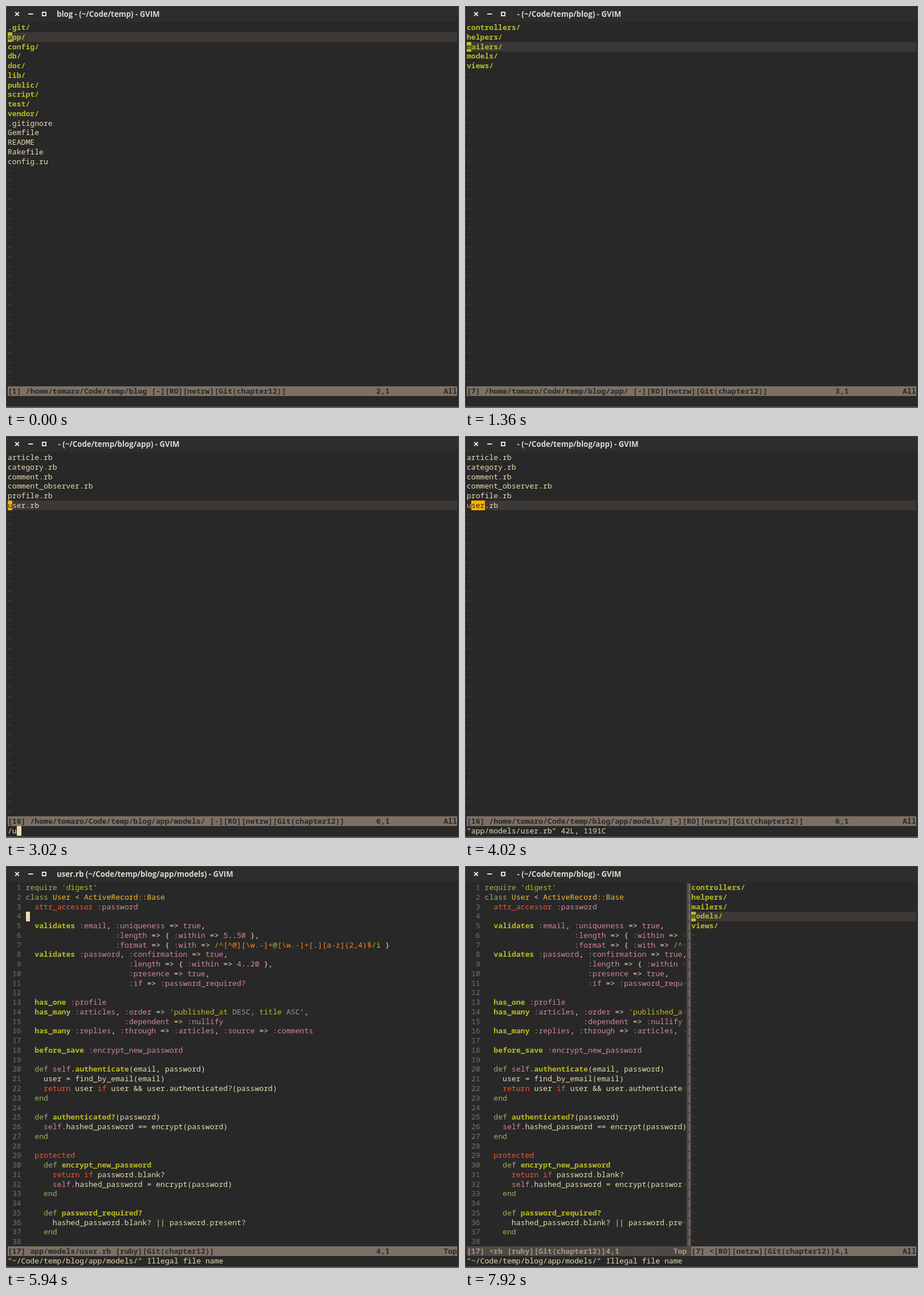
Recreate the animation shown at these times as an HTML page. Size 795 by 704 pixels, loop 8 s.

```html
<!DOCTYPE html>
<html lang="en">
<head>
<meta charset="utf-8">
<title>Editor session</title>
<style>
html, body { margin: 0; width: 100%; height: 100%; overflow: hidden; background: #282828; }
svg { display: block; width: 795px; height: 704px; }
#grid text { font: 13.143px "Noto Sans Mono", "DejaVu Sans Mono", monospace; white-space: pre; }
#grid text.b { font-weight: 700; }
rect { shape-rendering: crispEdges; }
#title { font: 700 13.25px "Open Sans", "Noto Sans", sans-serif; fill: #dcd9d2; }
</style>
</head>
<body>
<svg viewBox="0 0 795 704" xmlns="http://www.w3.org/2000/svg">
  <rect width="795" height="704" fill="#282828"/>
  <rect width="795" height="28" fill="#2d2d2c"/>
  <rect width="795" height="1" fill="#454542"/>
  <rect width="1" height="704" fill="#474744"/>
  <rect x="794" width="1" height="704" fill="#474744"/>
  <rect y="702" width="795" height="1" fill="#93938f"/>
  <g stroke="#e4e1da" fill="none">
    <path d="M16.2 10.7l6.6 6.6m0-6.6l-6.6 6.6" stroke-width="2"/>
    <path d="M39 14h8.500" stroke-width="2"/>
    <rect x="64" y="11" width="6" height="6" stroke-width="2"/>
  </g>
  <text id="title" y="18.600"></text>
  <g id="grid"></g>
</svg>
<script>
const LOOP = 8000, CW = 7.886, RH = 16.757, X0 = 3, Y0 = 29.5;
const COLS = 100, STATUS = 38, CMD = 39;
const BG = '#282828', FG = '#ebdbb2', GREEN = '#b8bb26', AQUA = '#9bb25c', RED = '#f5562f',
  PURPLE = '#d3869b', YELLOW = '#fabd2f', ORANGE = '#fe8019', BLUE = '#83a598',
  DIM = '#504945', NUMBER = '#7c6f64', LINE = '#3c3836', HIT = '#ffaf00', BAR = '#7c6f64', PALE = '#a89984';

const HOME = '/home/tomaro/Code/temp/blog';
const TAIL = '[RO][netrw][Git(chapter12)]';
const RUBY = '[ruby][Git(chapter12)]';

const dirs = {
  blog: {
    list: '.git/ app/ config/ db/ doc/ lib/ public/ script/ test/ vendor/ .gitignore Gemfile README Rakefile config.ru'.split(' '),
    status: `[1] ${HOME} [-]${TAIL}`
  },
  app: {
    list: 'controllers/ helpers/ mailers/ models/ views/'.split(' '),
    status: `[7] ${HOME}/app/ [-]${TAIL}`,
    narrow: `[7] <${TAIL}`
  },
  models: {
    list: 'article.rb category.rb comment.rb comment_observer.rb profile.rb user.rb'.split(' '),
    status: `[16] ${HOME}/app/models/ [-]${TAIL}`,
    narrow: `[16] <${TAIL.slice(1)}`
  }
};

const code = String.raw`require 'digest'
class User < ActiveRecord::Base
  attr_accessor :password

  validates :email, :uniqueness => true,
                    :length => { :within => 5..50 },
                    :format => { :with => /^[^@][\w.-]+@[\w.-]+[.][a-z]{2,4}$/i }
  validates :password, :confirmation => true,
                       :length => { :within => 4..20 },
                       :presence => true,
                       :if => :password_required?

  has_one :profile
  has_many :articles, :order => 'published_at DESC, title ASC',
                      :dependent => :nullify
  has_many :replies, :through => :articles, :source => :comments

  before_save :encrypt_new_password

  def self.authenticate(email, password)
    user = find_by_email(email)
    return user if user && user.authenticated?(password)
  end

  def authenticated?(password)
    self.hashed_password == encrypt(password)
  end

  protected
    def encrypt_new_password
      return if password.blank?
      self.hashed_password = encrypt(password)
    end

    def password_required?
      hashed_password.blank? || password.present?
    end
`.split('\n');

// Each rule: pattern, colour, bold, colours nested inside the match
const rules = [
  [/\/\^.*\/i/, GREEN, false, [/[\^\[\]\\{}$+]|\\?w\.-|a-z|2,4|(?<=\^)@/g, ORANGE]],
  [/'[^']*'/, GREEN, false, [/DESC|ASC/g, BLUE]],
  [/::/, YELLOW],
  [/:\w+\??/, PURPLE],
  [/(?<=def self\.)\w+|(?<=def )(?!self)[\w?]+/, GREEN, true],
  [/\b(?:validates|has_one|has_many|before_save)\b/, GREEN, true],
  [/\b(?:require|class|def|end)\b/, AQUA],
  [/\b(?:attr_accessor|protected|return|if)\b/, RED],
  [/\b(?:self|true|\d+)\b/, PURPLE],
  [/\b[A-Z]\w+/, YELLOW]
];
const lexer = new RegExp(rules.map(r => `(${r[0].source})`).join('|'), 'g');

function tint(line) {
  const cells = [...line].map(ch => ({ ch, fg: FG }));
  const paint = (at, len, fg, b) => {
    for (let i = at; i < at + len; i++) Object.assign(cells[i], { fg, b });
  };
  for (const m of line.matchAll(lexer)) {
    const [, fg, bold, inner] = rules[m.slice(1).findIndex(g => g !== undefined)];
    paint(m.index, m[0].length, fg, bold);
    if (inner) for (const n of m[0].matchAll(inner[0])) paint(m.index + n.index, n[0].length, inner[1]);
  }
  return cells;
}

const at = '~/Code/temp/blog';
const titles = {
  blog: 'blog - (~/Code/temp) - GVIM',
  app: `- (${at}) - GVIM`,
  models: `- (${at}/app) - GVIM`,
  user: `user.rb (${at}/app/models) - GVIM`
};
const opened = '"app/models/user.rb" 42L, 1191C';

// Each entry changes only the listed fields
const steps = [
  [0, { title: 'blog', dir: 'blog', row: 2, on: true, cmd: '', hits: 0, typing: false, file: false }],
  [290, { on: false }],
  [580, { on: true }],
  [760, { dir: 'app' }],
  [800, { title: 'app' }],
  [1360, { row: 3 }],
  [1550, { row: 4 }],
  [2070, { dir: 'models' }],
  [2110, { title: 'models' }],
  [2820, { typing: true, cmd: '/u' }],
  [3020, { row: 6, hits: 1 }],
  [3060, { cmd: '/us', hits: 2 }],
  [3100, { cmd: '/use', hits: 3 }],
  [3140, { cmd: '/user', hits: 4 }],
  [3530, { typing: false }],
  [4020, { cmd: opened }],
  [4120, { file: true, title: 'user', row: 1 }],
  [4840, { row: 2 }],
  [5060, { row: 3 }],
  [5190, { row: 4 }],
  [5570, { cmd: '' }],
  [5610, { hits: 0 }],
  [5940, { cmd: '"~/Code/temp/blog/app/models/" Illegal file name' }],
  [5980, { split: true, title: 'models', row: 6 }],
  [6670, { on: false }],
  [6880, { dir: 'app', row: 4, on: true }],
  [6920, { title: 'app' }],
  [7670, { on: false }],
  [7920, { on: true }]
];
const states = [];
for (const [time, change] of steps) states.push({ ...states.at(-1), ...change, time });

const layer = document.getElementById('grid');
const title = document.getElementById('title');
let cells;

function put(row, col, text, fg = FG, b = false) {
  [...text].forEach((ch, i) => Object.assign(cells[row][col + i], { ch, fg, b }));
}
function fill(row, from, to, bg) {
  for (let c = from; c < to; c++) cells[row][c].bg = bg;
}
function invert(row, col) {
  const cell = cells[row][col];
  [cell.fg, cell.bg] = [cell.bg || BG, cell.fg];
}
function mark(row, col, text, size) {
  const word = 'user'.slice(0, size);
  for (const m of text.matchAll(new RegExp(word, 'gi')))
    for (let i = 0; i < size; i++) Object.assign(cells[row][col + m.index + i], { fg: BG, bg: HIT });
}

function status(from, to, left, pos, posCol, where, active) {
  fill(STATUS, from, to, active ? BAR : DIM);
  const fg = active ? BG : PALE;
  put(STATUS, from, left, fg, true);
  put(STATUS, posCol, pos, fg, true);
  put(STATUS, to - 3, where, fg, true);
}

function browser(s, col) {
  const { list, status: wide, narrow } = dirs[s.dir];
  fill(s.row - 1, col, COLS, LINE);
  for (let r = 0; r < STATUS; r++) {
    const name = list[r];
    if (!name) put(r, col, '~', DIM);
    else if (name.endsWith('/')) put(r, col, name, GREEN, true);
    else put(r, col, name);
    if (name && s.hits && !s.split) mark(r, col, name, s.hits);
  }
  status(col, COLS, col ? narrow : wide, s.row + ',1', 82, 'All', true);
}

function editor(s, width) {
  const room = width - 4;
  for (let r = 0; r < STATUS; r++) {
    const line = code[r] || '';
    put(r, 0, String(r + 1).padStart(3), NUMBER);
    const cut = line.length > room;
    tint(line).slice(0, cut ? room - 1 : room).forEach((cell, i) => Object.assign(cells[r][4 + i], cell));
    if (cut) put(r, width - 1, '>', DIM);
    if (s.hits) mark(r, 4, line, s.hits);
  }
  if (s.split) {
    status(0, width, '[17] <rb ' + RUBY, '4,1', 31, 'Top', false);
    for (let r = 0; r <= STATUS; r++) {
      fill(r, width, width + 1, DIM);
      if (r < STATUS) put(r, width, '|', PALE);
    }
  } else {
    status(0, width, '[17] app/models/user.rb ' + RUBY, s.row + ',1', 82, 'Top', true);
  }
}

function add(tag, attrs, text) {
  const el = document.createElementNS('http://www.w3.org/2000/svg', tag);
  for (const k in attrs) el.setAttribute(k, attrs[k]);
  if (text) el.textContent = text;
  layer.appendChild(el);
}

// Calls visit(start, end) for every stretch of cells sharing a key
function runs(line, key, visit) {
  for (let a = 0, b; a < COLS; a = b) {
    const k = key(line[a]);
    for (b = a + 1; b < COLS && key(line[b]) === k; b++);
    if (k) visit(a, b);
  }
}

function render() {
  layer.replaceChildren();
  cells.forEach((line, r) => {
    const top = Math.round(Y0 + r * RH), bottom = Math.round(Y0 + (r + 1) * RH);
    runs(line, c => c.bg, (a, b) => {
      const x = Math.round(X0 + a * CW);
      add('rect', { x, y: top, width: Math.round(X0 + b * CW) - x, height: bottom - top, fill: line[a].bg });
    });
    runs(line, c => c.ch === ' ' ? '' : c.fg + !!c.b, (a, b) => {
      add('text', {
        x: (X0 + a * CW).toFixed(2), y: (Y0 + r * RH + 12.6).toFixed(2),
        fill: line[a].fg, class: line[a].b ? 'b' : ''
      }, line.slice(a, b).map(c => c.ch).join(''));
    });
  });
}

function draw(s) {
  cells = Array.from({ length: 40 }, () => Array.from({ length: COLS }, () => ({ ch: ' ', fg: FG })));
  if (s.file) editor(s, s.split ? 49 : COLS);
  if (!s.file || s.split) browser(s, s.split ? 50 : 0);
  put(CMD, 0, s.cmd);
  if (s.typing) invert(CMD, s.cmd.length);
  else if (s.on) invert(s.row - 1, s.split ? 50 : s.file ? 4 : 0);
  title.textContent = titles[s.title];
  title.setAttribute('x', titles[s.title][0] === '-' ? 91.5 : 89);
  render();
}

let shown;
function tick() {
  const t = performance.now() % LOOP;
  const s = states.findLast(v => v.time <= t);
  if (s !== shown) draw(shown = s);
  requestAnimationFrame(tick);
}
tick();
</script>
</body>
</html>
```
